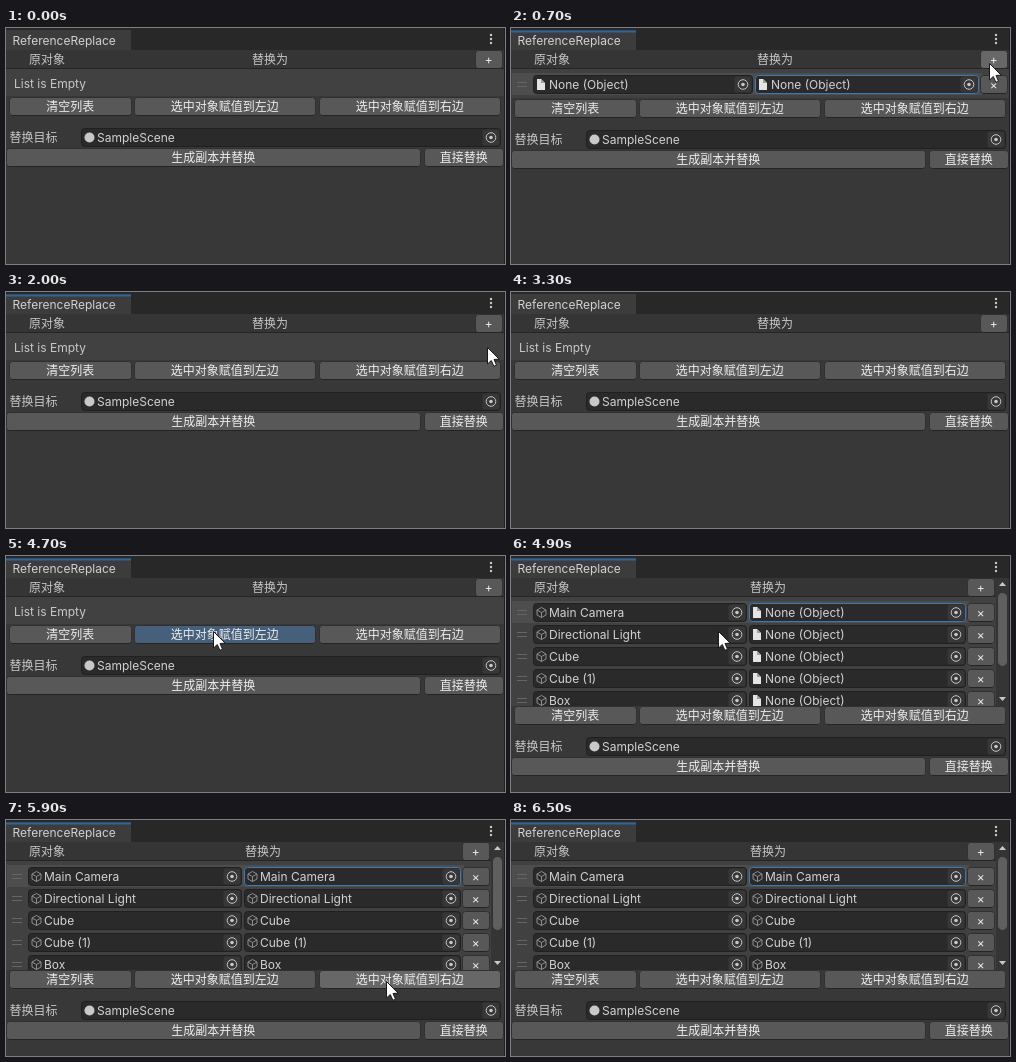
These frames come from a looping animation (499 by 236 pixels, 8000 ms). An HTML page with a canvas:

```html
<!DOCTYPE html>
<html lang="zh">
<head>
<meta charset="utf-8">
<title>ReferenceReplace</title>
<style>
html, body { margin: 0; width: 100%; height: 100%; overflow: hidden; background: #383838; }
canvas { display: block; }
</style>
</head>
<body>
<canvas id="stage" width="499" height="236"></canvas>
<script>
const ctx = document.getElementById('stage').getContext('2d');
const LOOP = 8000, STEP = 100;
const OBJECTS = ['Main Camera', 'Directional Light', 'Cube', 'Cube (1)', 'Box'];
const BLUE = '#3a79bb', LABEL = '#c8c8c8';

// Pointer visits: each key is [time, x, y]; the pointer is hidden between visits.
const VISITS = [
  [[200, 488, 34], [300, 478, 35], [800, 478, 35], [1100, 441, 54], [1300, 452, 57],
   [1600, 481, 55], [2100, 481, 55], [2400, 4, 51]],
  [[4200, 3, 60], [4400, 120, 69], [4600, 207, 75], [4900, 207, 75], [5400, 324, 151],
   [5700, 380, 161], [5900, 380, 161], [6400, 489, 25]]
];

function pointerAt(t) {
  const keys = VISITS.find(v => t >= v[0][0] && t <= v[v.length - 1][0]);
  if (!keys) return null;
  const i = Math.max(1, keys.findIndex(k => k[0] >= t));
  const [t0, x0, y0] = keys[i - 1], [t1, x1, y1] = keys[i];
  const p = (t - t0) / (t1 - t0);
  return { x: Math.round(x0 + (x1 - x0) * p), y: Math.round(y0 + (y1 - y0) * p) };
}

function rect(x, y, w, h, color) {
  ctx.fillStyle = color;
  ctx.fillRect(x, y, w, h);
}

function rounded(x, y, w, h, r, fill, stroke) {
  ctx.beginPath();
  ctx.roundRect(x + 0.5, y + 0.5, w - 1, h - 1, r);
  ctx.fillStyle = fill;
  ctx.fill();
  if (!stroke) return;
  ctx.strokeStyle = stroke;
  ctx.lineWidth = 1;
  ctx.stroke();
}

function disc(x, y, r, color) {
  ctx.beginPath();
  ctx.arc(x, y, r, 0, 7);
  ctx.fillStyle = color;
  ctx.fill();
}

function text(str, x, cy, color = LABEL, align = 'left') {
  ctx.font = '12px Inter, "Noto Sans CJK SC", "Noto Sans CJK", sans-serif';
  ctx.textAlign = align;
  ctx.fillStyle = color;
  ctx.fillText(str, x, cy + 4);
}

function polygon(points, fill, stroke) {
  ctx.beginPath();
  points.forEach(([x, y]) => ctx.lineTo(x, y));
  ctx.closePath();
  if (fill) { ctx.fillStyle = fill; ctx.fill(); }
  if (stroke) { ctx.strokeStyle = stroke; ctx.lineWidth = 1; ctx.stroke(); }
}

function button(label, x, y, w, pointer, pressed) {
  const hover = pointer && pointer.x >= x && pointer.x < x + w &&
    pointer.y > y + 2 && pointer.y < y + 19;
  rounded(x, y, w, 19, 3, pressed ? '#46607c' : hover ? '#676767' : '#585858', '#303030');
  rect(x + 3, y + 18, w - 6, 1, '#242424');
  text(label, x + w / 2 - 0.2, y + 10.4, '#eeeeee', 'center');
}

function pageIcon(x, cy) {
  polygon([[x + 1, cy - 5], [x + 5, cy - 5], [x + 9, cy - 1], [x + 9, cy + 6], [x + 1, cy + 6]], '#e4e4e4');
  polygon([[x + 5, cy - 5], [x + 9, cy - 1], [x + 5, cy - 1]], '#a0a0a0');
}

function cubeIcon(x, cy) {
  const cx = x + 5.5, w = 4.5;
  polygon([[cx, cy - 4.5], [cx + w, cy - 2], [cx + w, cy + 3], [cx, cy + 5.5], [cx - w, cy + 3], [cx - w, cy - 2]], null, '#8e8e8e');
  ctx.beginPath();
  ctx.moveTo(cx - w, cy - 2);
  ctx.lineTo(cx, cy + 0.5);
  ctx.lineTo(cx + w, cy - 2);
  ctx.moveTo(cx, cy + 0.5);
  ctx.lineTo(cx, cy + 5.5);
  ctx.stroke();
}

function sceneIcon(x, cy) {
  disc(x + 5.5, cy + 0.5, 5, LABEL);
}

function field(label, icon, x, y, w, focused) {
  const cy = y + 9, px = x + w - 10;
  rounded(x, y, w, 19, 3, '#2a2a2a', focused ? BLUE : '#202020');
  rounded(x + w - 19, y + 1, 18, 17, 2, '#373737');
  icon(x + 3, cy);
  text(label, x + 16, cy + 1, '#d2d2d2');
  ctx.beginPath();
  ctx.arc(px, cy + 0.5, 4.8, 0, 7);
  ctx.strokeStyle = LABEL;
  ctx.lineWidth = 1;
  ctx.stroke();
  disc(px, cy + 0.5, 1.8, LABEL);
}

function row(y, selected, left, right, split, end, focused, pointer, removing) {
  if (selected) rect(1, y - 2, end + 2, 22, '#4d4d4d');
  rect(6, y + 7, 10, 1, '#666666');
  rect(6, y + 11, 10, 1, '#666666');
  field(left || 'None (Object)', left ? cubeIcon : pageIcon, 22, y, split - 24, false);
  field(right || 'None (Object)', right ? cubeIcon : pageIcon, split, y, end - split, focused);
  button('×', end + 1, y, 28, pointer, removing);
}

function tabBar(active) {
  rect(0, 0, 499, 22, '#282828');
  rect(0, 2, 125, 20, '#3c3c3c');
  if (active) rect(0, 2.5, 125, 2, '#2c6599');
  text('ReferenceReplace', 6.5, 13, '#d2d2d2');
  for (const y of [7, 11, 15]) disc(485, y, 1.2, LABEL);
}

function scrollBar() {
  rect(485, 22, 13, 128, '#353535');
  polygon([[488, 30], [491.5, 26], [495, 30]], LABEL);
  polygon([[488, 141], [491.5, 145], [495, 141]], LABEL);
  rounded(486, 36, 11, 75, 5, '#5f5f5f', '#323232');
}

function list(t, pointer) {
  const single = t >= 600 && t < 1900;
  const filled = t >= 4900;
  const split = filled ? 238 : 244;
  const right = filled ? 485 : 498;
  const bottom = filled ? 150 : single ? 70 : 68;

  ctx.save();
  ctx.beginPath();
  ctx.rect(0, 22, 499, bottom - 22);
  ctx.clip();
  rect(0, 22, right, bottom - 22, '#414141');
  rect(0, 22, right, 19, '#353535');
  rect(0, 40, right, 1, '#242424');
  text('原对象', 23, 32);
  text('替换为', filled ? 239 : 246, 32);
  button('+', filled ? 456 : 469, 22, 28, pointer, t === 500);

  if (filled) {
    OBJECTS.forEach((name, i) =>
      row(47 + i * 22, i === 0, name, t >= 5900 && name, split, 455, i === 0, pointer, false));
    scrollBar();
  } else if (single) {
    row(47, true, null, null, split, 468, true, pointer, t === 1800);
  } else {
    text('List is Empty', 8, 56);
  }
  ctx.restore();
  return filled ? 81 : single ? 2 : 0;
}

function drawPointer({ x, y }) {
  const shape = [[0, 0], [0, 16.5], [3.8, 13], [6.4, 18.8], [9, 17.7], [6.5, 12], [11.6, 11.6]];
  polygon(shape.map(([dx, dy]) => [x + 0.5 + dx, y + 0.5 + dy]), '#ffffff', '#1a1a1a');
}

function draw(t) {
  const pointer = pointerAt(t);
  rect(0, 0, 499, 236, '#383838');
  tabBar((t >= 500 && t < 3300) || t >= 4700);
  const shift = list(t, pointer);

  button('清空列表', 3, 69 + shift, 123, pointer);
  button('选中对象赋值到左边', 128, 69 + shift, 182, pointer, t >= 4700 && t < 4900);
  button('选中对象赋值到右边', 313, 69 + shift, 182, pointer, t === 5800);
  text('替换目标', 3.5, 110 + shift);
  field('SampleScene', sceneIcon, 75, 100 + shift, 420, false);
  button('生成副本并替换', 0, 120 + shift, 415, pointer);
  button('直接替换', 418, 120 + shift, 80, pointer);
  rect(498, 0, 1, 236, '#1e1e1e');

  if (pointer) drawPointer(pointer);
}

const start = performance.now();
function tick() {
  const t = (performance.now() - start) % LOOP;
  draw(Math.floor(t / STEP) * STEP);
  requestAnimationFrame(tick);
}
tick();
</script>
</body>
</html>
```
